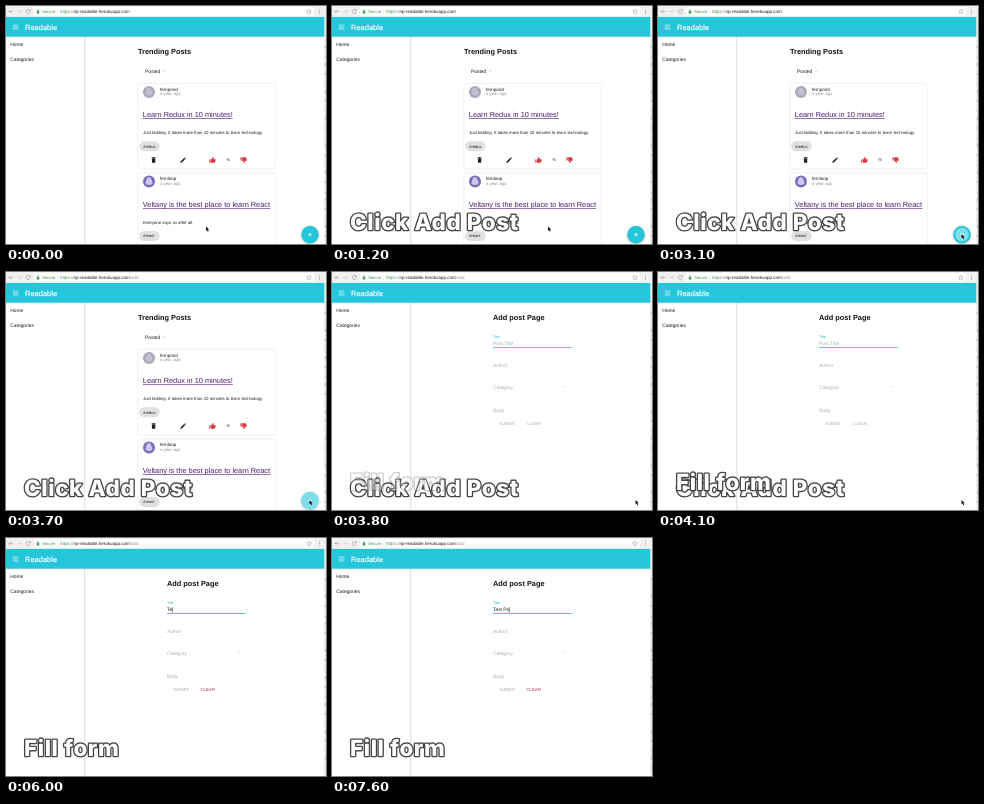
Animation of 320x238 px, one loop 8 s. Source, as an HTML page:

```html
<!DOCTYPE html>
<html lang="en">
<head>
<meta charset="utf-8">
<title>Readable</title>
<style>
  html, body { margin: 0; width: 100%; height: 100%; overflow: hidden; background: #fff; }
  svg { display: block; width: 100vw; height: 100vh; }
  text { font-family: "Liberation Sans", Arial, sans-serif; font-size: 4.9px; fill: #1c1c1c;
         text-rendering: geometricPrecision; white-space: pre; }
  .h { font-size: 7.36px; font-weight: 700; fill: #111; }
  .link { font-size: 7.36px; fill: #4b1a70; }
  .small { font-size: 4.3px; }
  .user { font-size: 4.5px; }
  .tag { font-size: 4px; }
  .dim { fill: #8f8f8f; }
  .hint { fill: #aeaeae; }
  .brand { font-size: 7.5px; fill: #fff; stroke: #fff; stroke-width: .15px; }
  .cap { font-family: Inter, "Open Sans", sans-serif; font-size: 22.4px; font-weight: 800; letter-spacing: .6px;
         fill: #fff; stroke: #444; stroke-width: 2.6px; stroke-linejoin: round; paint-order: stroke; }
</style>
</head>
<body>
<svg viewBox="0 0 320 238" preserveAspectRatio="none">
  <defs>
    <filter id="soft" x="-40%" y="-40%" width="180%" height="180%"><feGaussianBlur stdDeviation="1"/></filter>
    <clipPath id="fabClip"><circle cx="304" cy="228.6" r="8.8"/></clipPath>
    <path id="thumb" d="M-3.6-.6h1.4V3.2h-1.4ZM-1.6-.6 .8-3.4Q1.8-3.4 1.5-2.2L1.2-.9H3.4Q4-.7 3.8 0L2.7 2.8Q2.5 3.2 2 3.2H-1.6Z" fill="#d93a40"/>
    <path id="bin" d="M-1.9-1.6H1.9V2.6Q1.9 3.2 1.3 3.2H-1.3Q-1.9 3.2-1.9 2.6ZM-2.4-2.9H-1L-.6-3.3H.6L1-2.9H2.4V-2.1H-2.4Z" fill="#222"/>
    <path id="pen" d="M-3 3V1.7L1-2.3 2.3-1-1.7 3ZM1.4-2.7 2-3.2Q2.3-3.3 3.1-2.4 3.3-2 2.6-1.4Z" fill="#222"/>
  </defs>
  <rect width="320" height="238" fill="#fff"/>

  <g id="feed">
    <text class="h" x="132" y="48.4">Trending Posts</text>
    <text x="139" y="67">Posted</text>
    <path d="M156.9 64.8h2.4l-1.2 1.2Z" fill="#c4c4c4"/>
    <g id="cards"></g>
  </g>

  <g id="form">
    <text class="h" x="161" y="48.2">Add post Page</text>
    <text x="161" y="66" style="font-size:3.7px;fill:#26b5c8">Title</text>
    <text id="hint" class="hint" x="161" y="73.2">Post Title</text>
    <text id="typed" x="161" y="73.2"></text>
    <rect id="caret" y="69" width=".5" height="5.6" fill="#333"/>
    <rect x="161" y="75" width="78.5" height=".9" fill="#3cc8d8"/>
    <text class="hint" x="161" y="95">Author</text>
    <text class="hint" x="161" y="117">Category</text>
    <path d="M232 114.5h2l-1 1Z" fill="#bbb"/>
    <text class="hint" x="161" y="139.6">Body</text>
    <text class="hint small" x="167" y="152.8">SUBMIT</text>
    <text id="clear" class="small" x="194.5" y="152.8">CLEAR</text>
  </g>

  <!-- drawer -->
  <rect x="78.4" y="31" width=".8" height="207" fill="#d4d4d4"/>
  <text x="4.3" y="39.8">Home</text>
  <text x="4.3" y="54.6">Categories</text>

  <!-- app bar -->
  <rect y="30" width="318.5" height="1.2" opacity=".12" filter="url(#soft)"/>
  <rect y="10.7" width="318.5" height="20" fill="#26c6da"/>
  <path d="M6.8 19.2h5.6M6.8 21.1h5.6M6.8 23h5.6" stroke="#fff" stroke-width=".7" opacity=".85"/>
  <text class="brand" x="19" y="23.6">Readable</text>

  <!-- browser bar -->
  <rect width="320" height="10.7" fill="#f1f1f1"/>
  <rect x="28" y="1" width="280" height="9" rx="1.2" fill="#fff"/>
  <g fill="none" stroke="#999" stroke-width=".6">
    <path d="M7 5.5H3M4.8 3.7 3 5.5 4.8 7.3"/>
    <path d="M11 5.5h4M13.2 3.7 15 5.5 13.2 7.3" stroke="#ccc"/>
    <path d="M24 4.5A2 2 0 1 0 24.2 6.2M24.4 3.2V4.8H22.8"/>
    <path d="M303 3.1l.7 1.6 1.7.2-1.3 1.1.4 1.7-1.5-.9-1.5.9.4-1.7-1.3-1.1 1.7-.2Z" stroke-width=".5"/>
  </g>
  <path d="M313.2 3.2h.8V4h-.8ZM313.2 5.1h.8v.8h-.8ZM313.2 7h.8v.8h-.8Z" fill="#888"/>
  <path d="M30.8 5h2.4v2.5h-2.4Z" fill="#3a9455"/>
  <path d="M31.2 5V4.3a.8.8 0 0 1 1.6 0V5" fill="none" stroke="#3a9455" stroke-width=".5"/>
  <text x="36" y="7.1" style="font-size:4.2px;fill:#3a9455">Secure</text>
  <rect x="51.2" y="3" width=".4" height="5" fill="#ddd"/>
  <text x="54" y="7.1" style="font-size:4.5px"><tspan fill="#3a9455">https</tspan><tspan fill="#888">://</tspan>np-readable.herokuapp.com<tspan id="path" fill="#999">/add</tspan></text>

  <!-- window edge -->
  <rect x="318.5" y="10.7" width="1.5" height="228" fill="#e6e6e6"/>
  <path d="M319.4 40V236" stroke="#aaa" stroke-width=".8" stroke-dasharray="2 9 1 5 3 7"/>

  <g id="fab">
    <circle cx="304" cy="229.4" r="8.8" opacity=".25" filter="url(#soft)"/>
    <circle cx="304" cy="228.6" r="8.8" fill="#26c6da"/>
    <path d="M302 228.6h4M304 226.6v4" stroke="#fff" stroke-width=".7"/>
    <circle id="ripple" cx="304" cy="228.6" fill="#fff" opacity=".4" clip-path="url(#fabClip)"/>
  </g>

  <text id="cap1" class="cap" x="18" y="223.7">Click Add Post</text>
  <text id="cap2" class="cap" x="18" y="217.5">Fill form</text>
  <path id="mouse" d="M0 0V4.6L1.1 3.6 1.8 5.2 2.6 4.9 1.9 3.3H3.3Z" fill="#111" stroke="#fff" stroke-width=".4" paint-order="stroke"/>
</svg>
<script>
const LOOP = 8000;
const $ = id => document.getElementById(id);

function card(y, h, p) {
  const icon = (id, x, flip = 1) =>
    `<use href="#${id}" transform="translate(${x} ${y + 77}) scale(.88 ${.88 * flip})"/>`;
  const bar = () => icon("bin", 147.6) + icon("pen", 177.2) + icon("thumb", 206.4) +
    `<text class="small" x="219.8" y="${y + 78.3}">-5</text>` + icon("thumb", 237.6, -1);
  return `
    <rect x="131.8" y="${y + .4}" width="137.8" height="${h}" rx="2" fill="#fff" stroke="#ececec" stroke-width=".8"/>
    <circle cx="143" cy="${y + 9}" r="6" fill="${p.back}"/>
    <path d="M139.5 ${y + 11}q1-7 3.5-6.5t3.5 6.5q-3.5 3-7 0Z" fill="${p.front}"/>
    <text class="user" x="154" y="${y + 7.7}">${p.user}</text>
    <text class="small dim" x="154" y="${y + 12.4}">a year ago</text>
    <text class="link" x="136.8" y="${y + p.at}">${p.title}</text>
    <rect x="136.8" y="${y + p.at + 1}" width="${p.line}" height=".6" fill="#4b1a70"/>
    <text class="small" x="137" y="${y + p.at + 17}">${p.body}</text>
    <rect x="133.3" y="${y + p.at + 24}" width="20.4" height="10" rx="5" fill="#e0e0e0"/>
    <text class="tag" x="137.3" y="${y + p.at + 30.4}">${p.tag}</text>
    ${p.bar ? bar() : ""}`;
}

$("cards").innerHTML =
  card(77, 85.5, { user: "fernpond", title: "Learn Redux in 10 minutes!", line: 90, at: 34.2, bar: true,
    body: "Just kidding. It takes more than 10 minutes to learn technology.", tag: "#redux",
    back: "#a9a7b8", front: "#c3c1d0" }) +
  card(166.5, 90, { user: "fernloop", title: "Veltany is the best place to learn React", line: 127.5, at: 34.5,
    body: "Everyone says so after all.", tag: "#react", back: "#7d6bb8", front: "#cdc8ea" });

// [time, x, y] of the pointer tip
const route = [
  [0, 200, 220.5], [900, 200, 220.5], [1200, 216, 220.5], [1700, 210, 222], [1800, 210, 222],
  [2100, 294, 230], [2300, 294.5, 230], [2400, 295.5, 230], [2600, 303.5, 228], [LOOP, 303.5, 228]
];
// [time, text]
const typing = [[0, ""], [5600, "T"], [6000, "Te"], [6200, "Tes"], [6400, "Test"], [6600, "Test "],
  [7400, "Test P"], [7600, "Test Po"]];
// caret visibility switches
const blink = [[0, 0], [4200, 1], [4700, 0], [5200, 1], [7100, 0], [7400, 1]];

const ramp = (t, a, b) => Math.min(1, Math.max(0, (t - a) / (b - a)));
const latest = (list, t) => list.filter(s => s[0] <= t).pop()[1];
const set = (id, name, value) => $(id).setAttribute(name, value);
const show = (id, on) => set(id, "display", on ? "inline" : "none");

function pointer(t) {
  const i = route.findIndex(p => p[0] > t);
  const a = route[i - 1], b = route[i];
  const k = ramp(t, a[0], b[0]);
  return [a[1] + (b[1] - a[1]) * k, a[2] + (b[2] - a[2]) * k];
}

function draw(t) {
  const onForm = t >= 3800;
  show("feed", !onForm);
  show("fab", !onForm);
  show("form", onForm);
  show("path", t >= 3400);

  const wave = 1 - (1 - ramp(t, 2800, 3400)) ** 2;
  set("ripple", "r", 9 * wave);

  set("cap1", "opacity", ramp(t, 0, 300) * (1 - ramp(t, 4100, 4500)));
  set("cap2", "opacity", ramp(t, 3700, 4100));

  set("mouse", "transform", `translate(${pointer(t).join(" ")})`);
  show("mouse", t < 4500);

  const text = latest(typing, t);
  $("typed").textContent = text;
  show("hint", !text);
  const width = text ? $("typed").getSubStringLength(0, text.length) : 0;
  set("caret", "x", 161.2 + width);
  set("caret", "opacity", latest(blink, t));

  const k = ramp(t, 5550, 5750);
  const mix = (a, b) => Math.round(a + (b - a) * k);
  $("clear").style.fill = `rgb(${mix(174, 172)},${mix(174, 48)},${mix(174, 98)})`;
}

const start = performance.now();
function tick() {
  draw((performance.now() - start) % LOOP);
  requestAnimationFrame(tick);
}
tick();
</script>
</body>
</html>
```
